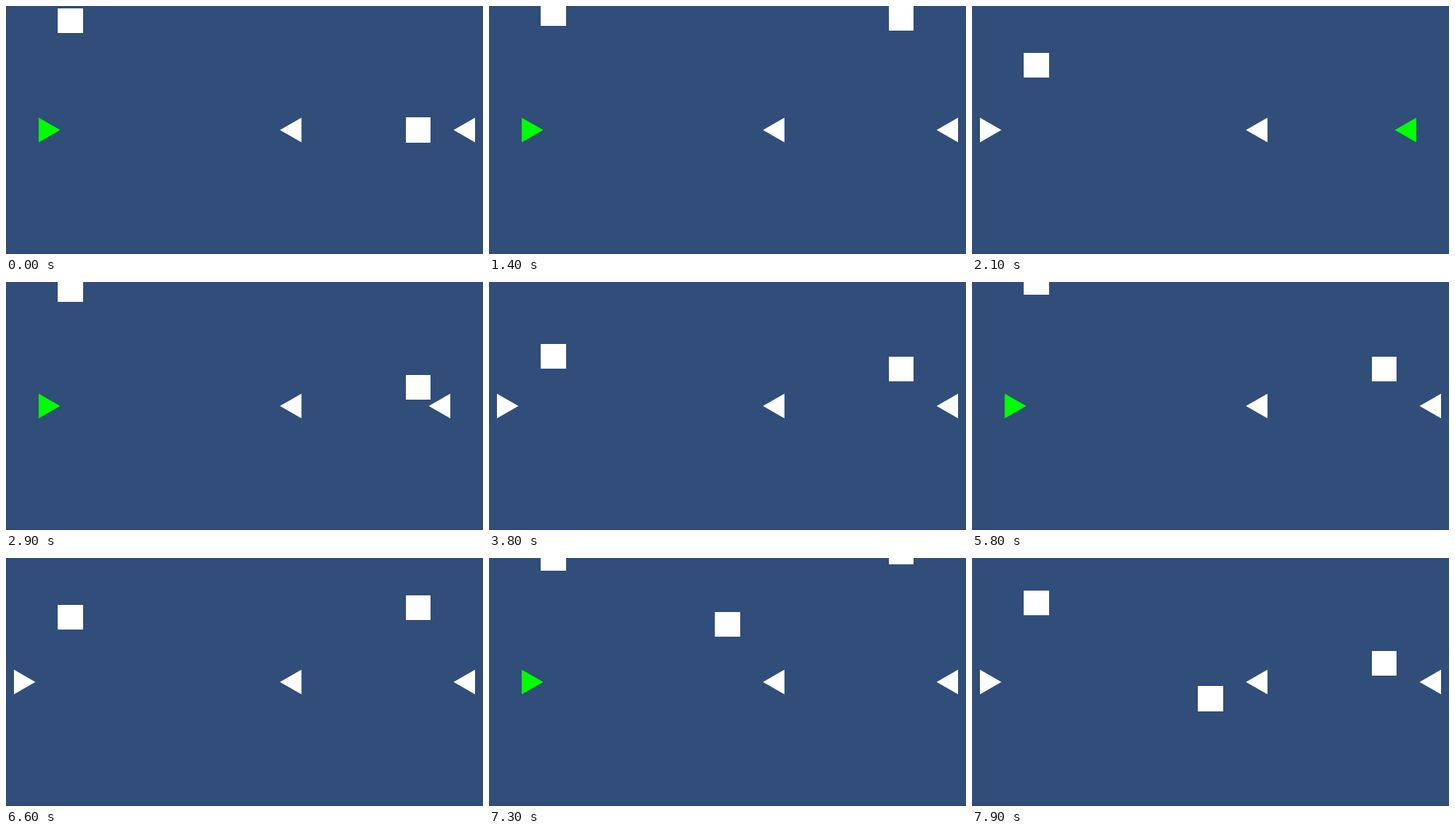
Animation of 600x312 px, one loop 8 s. Source, as an HTML page:

```html
<!DOCTYPE html>
<html lang="en">
<head>
<meta charset="utf-8">
<title>Falling squares</title>
<style>
  html, body { margin: 0; width: 100%; height: 100%; overflow: hidden; background: #314d79; }
  svg { display: block; width: 600px; height: 312px; }
  rect { shape-rendering: crispEdges; }
</style>
</head>
<body>
<svg viewBox="0 0 600 312" fill="#fff">
  <rect width="600" height="312" fill="#314d79"/>
  <rect y="311" width="600" height="1" fill="#34476b"/>
  <rect id="leftBox" x="65.4" width="31.4" height="31.2"/>
  <rect id="midBox" x="284.4" width="31.2" height="31.2"/>
  <rect id="rightBox" x="502.8" width="31.2" height="31.2"/>
  <path id="leftKey" d="M10 140.4L37 156L10 171.6Z"/>
  <path d="M371.6 140.4L344.6 156L371.6 171.6Z"/>
  <path id="rightKey" d="M590 140.4L563 156L590 171.6Z"/>
</svg>
<script>
  const UNIT = 31.2, STEP = 100, STEPS = 80;
  const el = id => document.getElementById(id);
  const [leftBox, midBox, rightBox, leftKey, rightKey] =
    ['leftBox', 'midBox', 'rightBox', 'leftKey', 'rightKey'].map(el);

  // Height is in units above the row of triangles.
  function placeBox(box, height, shown) {
    box.setAttribute('y', (140.4 - height * UNIT).toFixed(2));
    box.setAttribute('visibility', shown ? 'visible' : 'hidden');
  }

  function placeKey(key, direction, pressed, hit) {
    key.setAttribute('transform', `translate(${pressed ? direction * UNIT : 0} 0)`);
    key.setAttribute('fill', hit ? '#0f0' : '#fff');
  }

  function draw(step) {
    // Left lane: one square every 15 steps
    const left = (step + 2) % 15;
    const leftHit = left < 3;
    placeBox(leftBox, 5 - 0.3 * left, true);
    placeKey(leftKey, 1, leftHit || left === 14, leftHit);

    // Right lane: one square every 10 steps, with one late press
    const right = (step + 7) % 10;
    const late = step === 0 || step === STEPS - 1;
    const rightHit = !late && (right === 7 || right === 8);
    placeBox(rightBox, 5.25 - 0.75 * right, right < 7 || late);
    placeKey(rightKey, -1, rightHit || (!late && right === 6), rightHit);

    // Middle lane: a single missed square
    placeBox(midBox, 5.33 - 0.5 * (step - 67), step >= 67);
  }

  const start = performance.now();
  function tick() {
    draw(Math.floor(Math.max(0, performance.now() - start) / STEP) % STEPS);
    requestAnimationFrame(tick);
  }
  tick();
</script>
</body>
</html>
```
